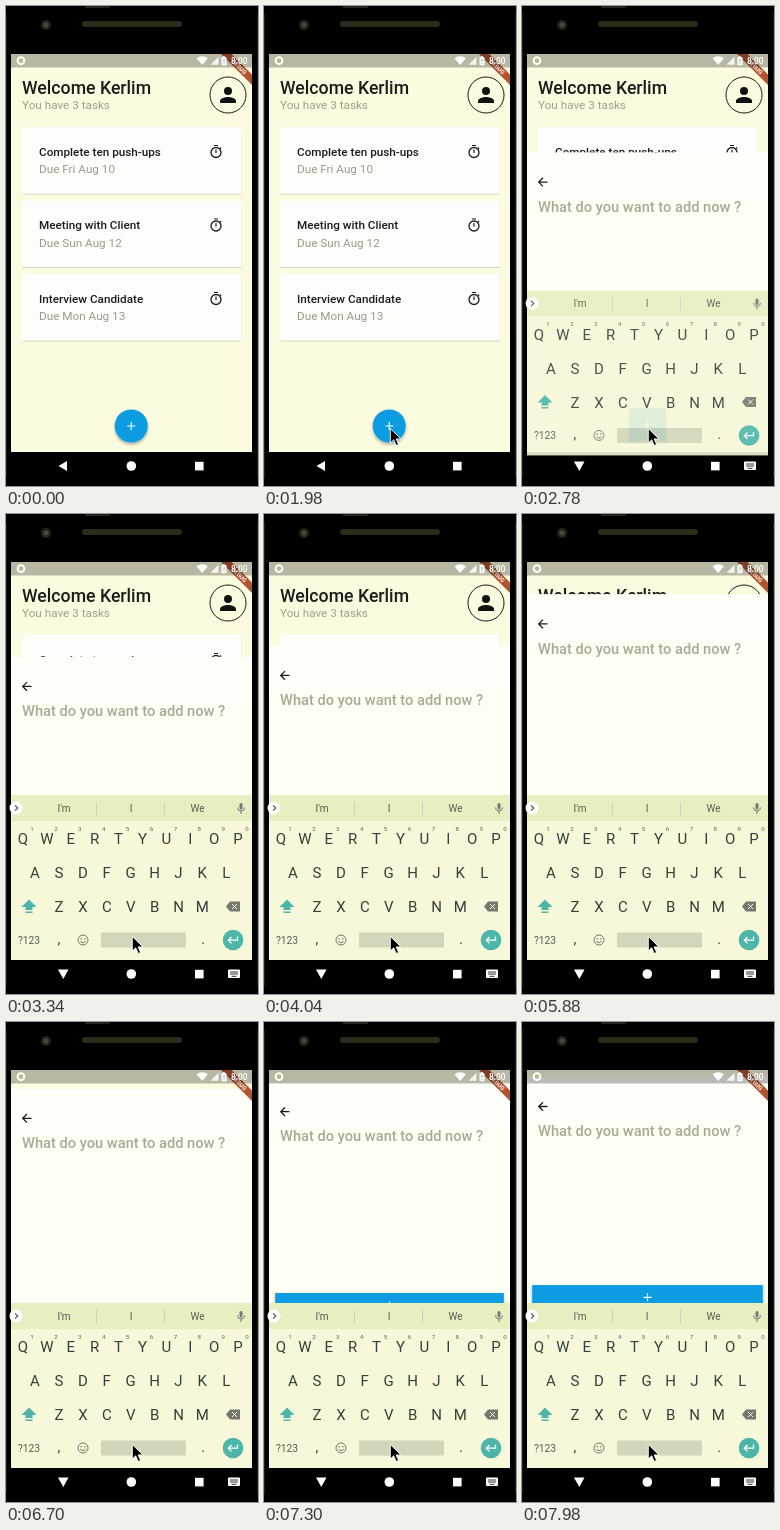
These frames come from a looping animation (252 px wide and 480 px high, 8000 ms). An HTML page:

```html
<!DOCTYPE html>
<html lang="en">
<head>
<meta charset="utf-8">
<title>To-do app</title>
<style>
  html, body { margin: 0; width: 100%; height: 100%; overflow: hidden; background: #000; }
  svg { display: block; width: 100%; height: 100%; font-family: Roboto, sans-serif; }
</style>
</head>
<body>
<svg id="stage" viewBox="0 0 252 480"></svg>
<script>
const LOOP = 8000;
const INK = '#1c1c1a', BLUE = '#119be2', TEAL = '#4db6a8', KEY = '#363e3e';

// Text placed by the middle of its capitals
const text = (s, x, y, size, fill, extra = '') =>
  `<text x="${x}" y="${y + size * 0.356}" font-size="${size}" fill="${fill}" ${extra}>${s}</text>`;
const mid = (s, x, y, size, fill, extra = '') =>
  text(s, x, y, size, fill, `text-anchor="middle" ${extra}`);
const rect = (x, y, w, h, fill, extra = '') =>
  `<rect x="${x}" y="${y}" width="${w}" height="${h}" fill="${fill}" ${extra}/>`;
const circle = (x, y, r, fill, extra = '') =>
  `<circle cx="${x}" cy="${y}" r="${r}" fill="${fill}" ${extra}/>`;
const line = (d, color, width = 1) =>
  `<path d="${d}" fill="none" stroke="${color}" stroke-width="${width}"/>`;
const shape = (d, fill, extra = '') => `<path d="${d}" fill="${fill}" ${extra}/>`;
const group = (id, body, extra = '') => `<g id="${id}" ${extra}>${body}</g>`;

const device = () =>
  rect(0, 0, 252, 480, '#000') +
  line('M.5 8V472M251.5 8V472', '#1e1e0c') +
  rect(79, 0, 25, 2, '#24241a') +
  circle(40, 19, 5, '#25251a') + circle(40, 19, 2.5, '#48483a') +
  rect(76, 15, 100, 6, '#2b2b1a', 'rx="3"');

const stopwatch = (x, y) =>
  circle(x, y + 1, 5, 'none', `stroke="${INK}" stroke-width="1.3"`) +
  line(`M${x - 2} ${y - 6}h4M${x} ${y - 2}v3.5M${x + 4} ${y - 4}l1.2 1.2`, INK, 1.2);

const card = ([title, due], i) => {
  const y = 121 + i * 73.5;
  return rect(16, y, 219.5, 66.5, '#fdfdfc', 'rx="1.5" filter="url(#low)"') +
    text(title, 33, y + 24.5, 11.72, INK, 'font-weight="500"') +
    text(due, 33, y + 42.3, 11.72, '#9b9b86') +
    stopwatch(210, y + 24.5);
};

const home = () =>
  rect(5, 48, 241, 398, '#fbfbdf') +
  text('Welcome Kerlim', 16, 81.7, 17.7, INK, 'font-weight="500"') +
  text('You have 3 tasks', 16, 99, 11.72, '#a0a08b') +
  circle(222, 89, 18, 'none', `stroke="${INK}"`) +
  circle(222, 85, 4, '#111') +
  shape('M214 97v-2c0-2.7 5.3-4 8-4s8 1.3 8 4v2z', '#111') +
  [['Complete ten push-ups', 'Due Fri Aug 10'],
   ['Meeting with Client', 'Due Sun Aug 12'],
   ['Interview Candidate', 'Due Mon Aug 13']].map(card).join('');

// Drawn at rest, with its top edge at y = 48
const page = () =>
  rect(5, 48, 241, 398, '#fefef4') +
  rect(5, 48, 241, 47, '#fffffa') +
  line('M25.5 77.5H16.8M21 73.2l-4.3 4.3 4.3 4.3', INK, 1.3) +
  text('What do you want to add now ?', 16, 102, 14.65, '#aaaa92', 'font-weight="500"');

const keyRow = (letters, x, y, step) =>
  [...letters].map((c, i) => mid(c, x + i * step, y, 15, KEY)).join('');

const keyboard = () => {
  const hints = [...'1234567890'].map((c, i) => mid(c, 26 + i * 23.9, 314.8, 6.2, '#62655a')).join('');
  return rect(5, 281, 241, 26, '#e9eec0') +
    rect(5, 307, 241, 139, '#f7f8d9') +
    circle(10, 294, 6.5, '#fff') + line('M9 291.3l2.7 2.7-2.7 2.7', '#555', 1.2) +
    mid("I'm", 58, 294.5, 10, '#575c54') +
    mid('I', 125, 294.5, 10, '#575c54') +
    mid('We', 191.5, 294.5, 10, '#575c54') +
    line('M90.5 288v13M158.5 288v13', '#cdd2b2') +
    rect(233.5, 289, 3, 6.5, '#777', 'rx="1.5"') +
    line('M231.5 293.5a3.5 3.5 0 0 0 7 0M235 297v3', '#777') +
    keyRow('QWERTYUIOP', 17, 324.8, 23.9) + hints +
    keyRow('ASDFGHJKL', 29, 358.8, 23.9) +
    keyRow('ZXCVBNM', 53, 392.8, 23.9) +
    shape('M23 385.5l7.5 7.5h-4v3h-7v-3h-4zM19.5 397.5h7v1.500h-7z', TEAL) +
    shape('M220 392.5l4-5h10v10h-10z', '#74786f') +
    line('M226 390l5 5M231 390l-5 5', '#f7f8dd') +
    mid('?123', 23, 426, 10.3, '#555b58') +
    mid(',', 53, 425, 14, KEY) + mid('.', 197, 425, 14, KEY) +
    circle(77, 426, 5, 'none', 'stroke="#74786f"') +
    circle(75.2, 424.7, .8, '#74786f') + circle(78.8, 424.7, .8, '#74786f') +
    line('M74.3 427.3q2.7 3 5.4 0', '#74786f') +
    rect(95, 418.5, 85, 15, '#d3d6ba', 'rx="1"') +
    circle(227, 426, 10.3, TEAL) +
    line('M231.5 422.5v3.7H222.5M225.5 423l-3.2 3.2 3.2 3.2', '#fff', 1.3);
};

const banner = () =>
  shape('M215 48h10.5L246 68.5V79z', '#b4532c') +
  mid('DEBUG', 0, 0, 5.8, '#fff', 'font-weight="700" transform="translate(233.2 60.8) rotate(45)"');

const status = () =>
  rect(5, 48, 241, 13.5, '#000', 'opacity=".27"') +
  circle(15, 54.7, 3.4, 'none', 'stroke="#fffff0" stroke-width="2"') +
  shape('M190.5 52.3q5.7-4 11.4 0L196.2 59z', '#fff') +
  shape('M204.5 58.8l8-8v8z', '#fff', 'opacity=".85"') +
  shape('M215.5 51.3h1.5v-1h2v1h1.5v8h-5z', '#fff') +
  line('M218 53v3M218 57v1', '#9a9a90', .9) +
  text('8:00', 225, 54.7, 8.3, '#fff', 'font-weight="500"');

const nav = () =>
  group('back', shape('M52.5 460l8.5-5v10z', '#fff')) +
  group('hide', shape('M52 455.5h10.5l-5.2 9.5z', '#fff') +
    rect(222, 455.5, 12, 8.5, '#fff', 'rx="1"') +
    line('M224 458h8M224 460h8M225.5 462.3h5', '#000', .8)) +
  circle(125.3, 460, 4.8, '#fff') +
  rect(189, 455.8, 8.6, 8.6, '#fff');

const stage = document.getElementById('stage');
stage.innerHTML =
  `<defs>
    <clipPath id="screen"><rect x="5" y="48" width="241" height="398"/></clipPath>
    <filter id="low" x="-5%" y="-10%" width="110%" height="125%">
      <feDropShadow dx="0" dy=".7" stdDeviation=".6" flood-opacity=".22"/></filter>
    <filter id="high" x="-30%" y="-30%" width="160%" height="170%">
      <feDropShadow dx="0" dy="2" stdDeviation="1.8" flood-opacity=".3"/></filter>
  </defs>` +
  device() +
  `<g clip-path="url(#screen)">` +
    home() + group('page', page()) +
    rect(0, 0, 0, 0, BLUE, 'id="add" filter="url(#high)"') +
    group('plus', line('M-4 0H4M0-4V4', '#fff', 1.2)) +
    banner() + status() +
  `</g>` + group('keys', keyboard()) + nav() +
  group('mouse', shape('M0 0V14.5l3.4-3.2 2.5 5.7 2.4-1.1-2.5-5.5h4.8z',
    '#000', 'stroke="#fff" stroke-width=".9"'));

const el = Object.fromEntries(
  ['page', 'add', 'plus', 'keys', 'back', 'hide', 'mouse'].map(id => [id, document.getElementById(id)]));
const set = (node, attrs) => { for (const k in attrs) node.setAttribute(k, attrs[k]); };
const clamp = v => Math.min(1, Math.max(0, v));
const mix = (a, b, p) => a + (b - a) * p;
const shown = on => ({ visibility: on ? 'visible' : 'hidden' });

// cubic-bezier(.4, 0, .2, 1)
function fastOutSlowIn(x) {
  let lo = 0, hi = 1;
  for (let i = 0; i < 24; i++) {
    const s = (lo + hi) / 2, r = 1 - s;
    if (1.2 * r * r * s + 0.6 * r * s * s + s * s * s < x) lo = s; else hi = s;
  }
  return lo * lo * (3 - 2 * lo);
}

function draw(t) {
  const open = t >= 2260;
  const p = fastOutSlowIn(clamp((t - 2260) / 8380));
  set(el.page, { transform: `translate(0 ${99.5 * (1 - p)})`, ...shown(open) });

  // The round button widens into the bar along an arc
  const wide = 1 - (1 - p) ** 2;
  const left = mix(108.7, 9.7, wide), right = mix(141.8, 241.3, wide);
  const top = mix(403.5, 252.4, p), bottom = mix(436.5, 276.3, p);
  set(el.add, { x: left, y: top, width: right - left, height: bottom - top, rx: open ? 0 : 16.5 });
  set(el.plus, { transform: `translate(${(left + right) / 2} ${(top + bottom) / 2})` });

  const k = clamp((t - 2400) / 460);
  set(el.keys, { transform: `translate(0 ${20 * (1 - k)})`, opacity: 1 - (1 - k) ** 1.3 });
  set(el.back, shown(t < 2380));
  set(el.hide, shown(t >= 2380));

  const m = 1 - (1 - clamp((t - 600) / 900)) ** 2;
  set(el.mouse, { transform: `translate(${mix(256, 126.3, m)} ${mix(438, 422.5, m)})` });
}

function tick() {
  draw(performance.now() % LOOP);
  requestAnimationFrame(tick);
}
tick();
</script>
</body>
</html>
```
